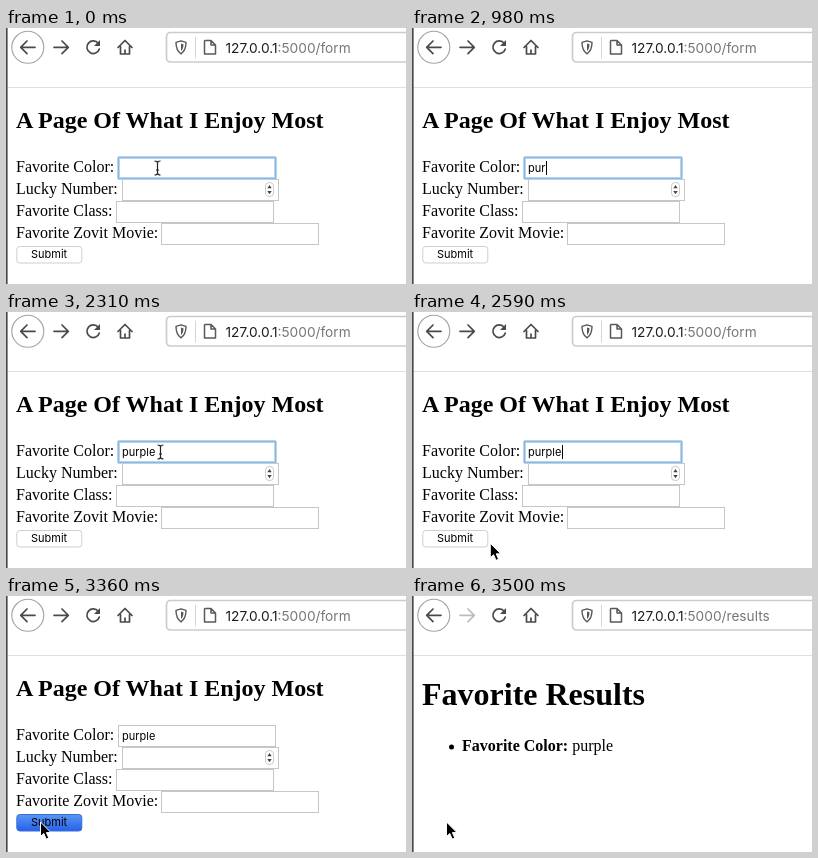
Write an HTML page that moves like this. It is 400 px wide and 256 px high and loops after 4.48 s.

```html
<!DOCTYPE html>
<html lang="en">
<head>
<meta charset="utf-8">
<title>Favorites form</title>
<style>
html, body { margin: 0; width: 100%; height: 100%; overflow: hidden; background: #fff; }
svg { display: block; width: 400px; height: 256px; }
text { font: 16px "Liberation Serif", serif; white-space: pre; }
.h1 { font-size: 32px; font-weight: bold; }
.h2 { font-size: 24px; font-weight: bold; }
.ui { font: 11px Inter, sans-serif; }
.url { font: 13.7px Inter, sans-serif; fill: #1c1c1e; }
.icon { fill: none; stroke: #4a4a4d; stroke-width: 1.7; stroke-linecap: round; stroke-linejoin: round; }
.field { fill: #fff; stroke: #c6c6c6; }
</style>
</head>
<body>
<svg viewBox="0 0 400 256">
  <linearGradient id="blue" x2="0" y2="1">
    <stop stop-color="#5a97f3"/>
    <stop offset="1" stop-color="#2560ea"/>
  </linearGradient>
  <path d="M0 59.5H400" stroke="#e0e0e0"/>
  <rect width="1.600" height="256" fill="#47474a"/>

  <g class="icon">
    <circle cx="21.800" cy="19.300" r="16" stroke="#a4a4a6" stroke-width="1.100"/>
    <path d="M29 19.300H15M21 13l-6.300 6.300 6.300 6.300"/>
    <path id="forward" d="M48 19.300h14M56 13l6.300 6.300-6.300 6.300"/>
    <path d="M92.300 15.500A6.300 6.300 0 1 0 93.300 21"/>
    <path d="M94 12v6h-6z" fill="#4a4a4d" stroke="none"/>
    <path d="M112 19.500l7-7 7 7M114.500 18.500v7.500h9v-7.500M119 26v-4"/>
    <rect x="160.500" y="4.500" width="260" height="29.500" rx="4" stroke="#cbcbcd"/>
    <path d="M175 12.800l5 1.500c0 6-1 9-5 11.500-4-2.500-5-5.500-5-11.500z" stroke="#58585b" stroke-width="1.400"/>
    <path d="M175 15.500v7.500c1.800-1.500 2.400-3.500 2.500-6.700z" fill="#58585b" stroke="none"/>
    <path d="M189.500 9v21" stroke="#d6d6d8" stroke-width="1"/>
    <path d="M199 12.500h6l4.500 4.500v9h-11v-13zM205 12.500v4.500h4.500" stroke="#58585b" stroke-width="1.500"/>
  </g>
  <text class="url" x="219.500" y="24.800">127.0.0.1<tspan fill="#77777a">:5000/<tspan id="page"></tspan></tspan></text>

  <g id="form">
    <text class="h2" x="10" y="100">A Page Of What I Enjoy Most</text>
    <text x="10" y="144">Favorite Color:</text>
    <text x="10" y="166">Lucky Number:</text>
    <text x="10" y="188">Favorite Class:</text>
    <text x="10" y="210">Favorite Zovit Movie:</text>
    <rect class="field" x="112.500" y="129.500" width="157" height="21"/>
    <rect class="field" x="116.500" y="151.500" width="156" height="21"/>
    <rect class="field" x="110.500" y="173.500" width="157" height="21"/>
    <rect class="field" x="155.500" y="195.500" width="157" height="21"/>
    <rect x="259.500" y="154.500" width="8" height="14" rx="3.500" fill="#fff" stroke="#cdcdcd"/>
    <path d="M261.300 160.300l2.200-3.300 2.200 3.300zM261.300 163l2.200 3.300 2.200-3.300z" fill="#444"/>
    <g id="focus" fill="none">
      <rect x="112.500" y="129.500" width="157" height="21" rx="1" stroke="#b4d4f0" stroke-width="3"/>
      <rect x="112.500" y="129.500" width="157" height="21" stroke="#8db8dc"/>
    </g>
    <text class="ui" id="typed" x="116" y="144.300"></text>
    <path id="caret" stroke="#000"/>
    <rect id="button" x="10.800" y="218.500" width="65" height="16.500" rx="3"/>
    <text class="ui" x="25" y="230.300">Submit</text>
  </g>

  <g id="results">
    <text class="h1" x="10" y="109">Favorite Results</text>
    <circle cx="39.500" cy="151" r="2.500"/>
    <text x="50" y="155"><tspan font-weight="bold">Favorite Color:</tspan> purple</text>
  </g>

  <path id="beam" d="M-3-7q3 0 3 2 0-2 3-2M0-5V5M-3 7q3 0 3-2 0 2 3 2M-1.500 2h3" fill="none" stroke="#222" stroke-width="1.200"/>
  <path id="arrow" d="M0 0v14.500l3.300-3 2.400 5.600 2.600-1.100-2.400-5.400h4.600z" stroke="#fff"/>
</svg>
<script>
const LOOP = 4480, STEP = 70, PRESS = 3290, SUBMIT = 3500;
const KEYS = [490, 630, 980, 1120, 1400, 1680];
const CARET_X = [117.5, 123.5, 129.5, 134.5, 141.5, 143.5, 150.5];
const MOVE_START = 2310, MOVE_TIME = 490;
const $ = id => document.getElementById(id);
const show = (id, on) => $(id).setAttribute("visibility", on ? "visible" : "hidden");
const between = (t, a, b) => t >= a && t < b;

const bezier = (p, a, b, c, d) => {
  const q = 1 - p;
  return q * q * q * a + 3 * q * q * p * b + 3 * q * p * p * c + p * p * p * d;
};

function pointer(t) {
  if (t < KEYS[0]) return [151.5, 140];
  const p = Math.min(1, Math.max(0, (t - MOVE_START) / MOVE_TIME));
  const e = p * p * (3 - 2 * p);
  return [bezier(e, 154.5, 140, 50, 34.5), bezier(e, 140, 180, 280, 226)];
}

function draw(now) {
  const t = Math.floor(now % LOOP / STEP) * STEP;
  const onForm = t < SUBMIT, pressed = between(t, PRESS, SUBMIT);
  const count = KEYS.filter(k => t >= k).length;

  show("form", onForm);
  show("results", !onForm);
  $("page").textContent = onForm ? "form" : "results";
  $("forward").setAttribute("stroke", onForm ? "#4a4a4d" : "#bcbcbe");
  $("typed").textContent = "purple".slice(0, count);
  $("caret").setAttribute("d", `M${CARET_X[count]} 133v14`);
  show("focus", t < PRESS);
  show("caret", between(t, KEYS[0], 1820) || between(t, 2380, 3010));
  $("button").setAttribute("fill", pressed ? "url(#blue)" : "#fff");
  $("button").setAttribute("stroke", pressed ? "#3a6fd8" : "#cfcfcf");

  const [x, y] = pointer(t);
  const visible = !between(t, KEYS[0], MOVE_START), overText = y < 152;
  show("beam", visible && overText);
  show("arrow", visible && !overText);
  for (const id of ["beam", "arrow"]) $(id).setAttribute("transform", `translate(${x} ${y})`);
}

function tick() {
  draw(performance.now());
  requestAnimationFrame(tick);
}
tick();
</script>
</body>
</html>
```
